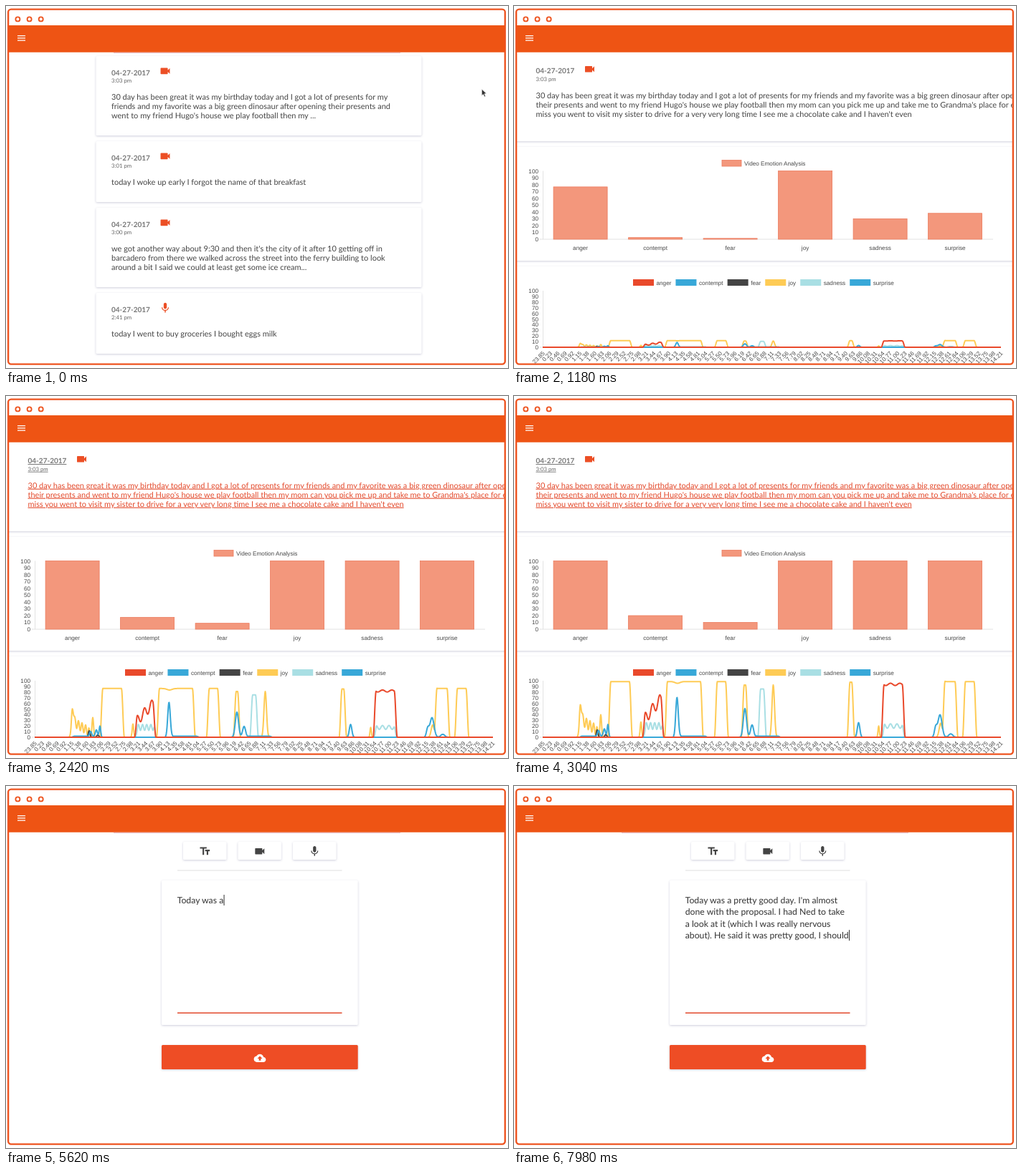
Write an HTML page that moves like this. It is 700x506 px and loops after 8 s.

```html
<!DOCTYPE html>
<html lang="en">
<head>
<meta charset="utf-8">
<title>Journal</title>
<style>
  html, body { margin: 0; width: 100%; height: 100%; overflow: hidden; background: #fff; }
  svg { display: block; width: 700px; height: 506px; }
  text { font-family: Lato, sans-serif; text-rendering: geometricPrecision; white-space: pre; }
  .date { font-size: 10px; font-weight: 700; fill: #777; }
  .time { font-size: 7.75px; fill: #666; }
  .body { font-size: 11px; fill: #444; }
  .hover text { text-decoration: underline; }
  .hover .body { fill: #e34a2c; }
  .chart text { font: 8.2px "Liberation Sans", Arial, sans-serif; fill: #484848; }
  .card { fill: #fff; filter: drop-shadow(0 1px 1.5px rgba(50, 50, 110, .24)); }
  .axis { stroke: #e2e2e2; stroke-width: 1; }
  .bar { fill: #f3977c; stroke: #ec7a5c; stroke-width: .8; }
  .line { fill: none; stroke-width: 2; stroke-linejoin: round; vector-effect: non-scaling-stroke; }
  .typed { font-size: 12.25px; fill: #333; }
</style>
</head>
<body>
<svg viewBox="0 0 700 506">
  <defs>
    <clipPath id="page"><rect x="4" y="64" width="691" height="435.5"/></clipPath>
    <path id="video" d="M17 10.5V7c0-.55-.45-1-1-1H4c-.55 0-1 .45-1 1v10c0 .55.45 1 1 1h12c.55 0 1-.45 1-1v-3.5l4 4v-11l-4 4z"/>
    <path id="mic" d="M12 14c1.66 0 3-1.34 3-3V5c0-1.66-1.34-3-3-3S9 3.34 9 5v6c0 1.66 1.34 3 3 3zm5.3-3c0 3-2.54 5.1-5.3 5.1S6.7 14 6.7 11H5c0 3.41 2.72 6.23 6 6.72V21h2v-3.28c3.28-.48 6-3.3 6-6.72z"/>
    <path id="type" d="M2.5 4v3h5v12h3V7h5V4zm19 5h-9v3h3v7h3v-7h3z"/>
    <path id="cloud" d="M19.35 10.04C18.67 6.59 15.64 4 12 4 9.11 4 6.6 5.64 5.35 8.04 2.34 8.36 0 10.91 0 14c0 3.31 2.69 6 6 6h13c2.76 0 5-2.24 5-5 0-2.64-2.05-4.78-4.65-4.96zM14 13v4h-4v-4H7l5-5 5 5z"/>
  </defs>
  <rect width="700" height="506" fill="#fff"/>
  <g clip-path="url(#page)">
    <g id="list"></g>
    <g id="detail"></g>
    <g id="editor"></g>
  </g>
  <rect x="3" y="27" width="693" height="37.7" fill="#ee5414"/>
  <path id="edge" d="M150 65.5H550" stroke="#e3b9c4"/>
  <g fill="none" stroke="#ee5420">
    <rect x="3.1" y="4.6" width="692.8" height="496" rx="4" stroke-width="2.4"/>
    <g stroke-width="1.9">
      <circle cx="16.4" cy="18.4" r="3"/><circle cx="32.6" cy="18.4" r="3"/><circle cx="48.7" cy="18.4" r="3"/>
    </g>
  </g>
  <path d="M16 41.7H27M16 44.9H27M16 48.1H27" stroke="#fff" stroke-width="1.3"/>
  <path id="cursor" d="M0 0V9.4L2.2 7.4L3.8 11L5.4 10.2L3.9 6.8L6.8 6.6Z" fill="#333" stroke="#fff" stroke-width=".7"/>
</svg>
<script>
const LOOP = 8000, ENTER = 340, OPEN = 950, HOVER = 1350, LEAVE = 4120, EDIT = 4420, TYPE = 5453;
const $ = id => document.getElementById(id);

function add(parent, tag, attrs = {}, content = "") {
  const node = document.createElementNS("http://www.w3.org/2000/svg", tag);
  for (const key in attrs) node.setAttribute(key, attrs[key]);
  node.textContent = content;
  return parent.appendChild(node);
}
const rect = (parent, x, y, width, height, attrs) => add(parent, "rect", { x, y, width, height, ...attrs });
const text = (parent, x, y, content, attrs) => add(parent, "text", { x, y, ...attrs }, content);
const hline = (parent, x1, x2, y, attrs) => add(parent, "line", { x1, x2, y1: y, y2: y, ...attrs });
const icon = (parent, name, cx, cy, fill = "#ec4f25", scale = .72) =>
  add(parent, "use", { href: "#" + name, fill, transform: `translate(${cx - 12 * scale} ${cy - 12 * scale}) scale(${scale})` });

function entry(parent, x, y, time, symbol, lines) {
  const group = add(parent, "g");
  text(group, x, y, "04-27-2017", { class: "date" });
  text(group, x, y + 10.8, time, { class: "time" });
  icon(group, symbol, x + 75, y - 5.7);
  lines.forEach((line, i) => text(group, x, y + 34.6 + i * 13, line, { class: "body" }));
  return group;
}

// List of entries
const list = $("list");
let cardTop = 70;
const entries = [
  ["3:03 pm", "video", ["30 day has been great it was my birthday today and I got a lot of presents for my",
    "friends and my favorite was a big green dinosaur after opening their presents and",
    "went to my friend Hugo's house we play football then my ..."]],
  ["3:01 pm", "video", ["today I woke up early I forgot the name of that breakfast"]],
  ["3:00 pm", "video", ["we got another way about 9:30 and then it's the city of it after 10 getting off in",
    "barcadero from there we walked across the street into the ferry building to look",
    "around a bit I said we could at least get some ice cream..."]],
  ["2:41 pm", "mic", ["today I went to buy groceries I bought eggs milk"]]
].map(([time, symbol, lines]) => {
  const y = cardTop, height = 72 + lines.length * 13;
  cardTop += height + 8;
  rect(list, 125.5, y, 454, height, { rx: 1.5, class: "card" });
  return entry(list, 147, y + 26.6, time, symbol, lines);
});

// Entry with charts
const detail = $("detail");
rect(detail, -5, 55, 720, 134, { class: "card" });
rect(detail, -5, 197, 720, 159, { class: "card" });
rect(detail, -5, 364, 720, 159, { class: "card" });
const story = entry(detail, 30.5, 94, "3:03 pm", "video", [
  "30 day has been great it was my birthday today and I got a lot of presents for my friends and my favorite was a big green dinosaur after opening",
  "their presents and went to my friend Hugo's house we play football then my mom can you pick me up and take me to Grandma's place for ever I",
  "miss you went to visit my sister to drive for a very very long time I see me a chocolate cake and I haven't even"]);

function axes(parent, top, bottom, right) {
  for (let v = 0; v <= 100; v += 10)
    text(parent, 34, bottom + 3 - (bottom - top) * v / 100, v, { "text-anchor": "end" });
  hline(parent, 36, right, bottom, { class: "axis" });
  add(parent, "line", { x1: 40.5, x2: 40.5, y1: top, y2: bottom, class: "axis" });
}

const chart = add(detail, "g", { class: "chart" });
rect(chart, 290, 215.5, 27, 8.5, { class: "bar" });
text(chart, 321, 223, "Video Emotion Analysis");
axes(chart, 230.5, 326, 668);
const totals = { anger: 640, contempt: 20, fear: 10, joy: 900, sadness: 250, surprise: 317 };
const bars = Object.entries(totals).map(([name, total], i) => {
  const cx = 92.6 + i * 104.5;
  text(chart, cx, 341, name, { "text-anchor": "middle" });
  return { total, node: rect(chart, cx - 37.5, 326, 75, 0, { class: "bar" }) };
});

const colors = { anger: "#e9492b", contempt: "#38a8d8", fear: "#444", joy: "#fecb55", sadness: "#a9dfe4", surprise: "#38a8d8" };
let legendX = 166;
for (const name in colors) {
  rect(chart, legendX, 382, 29, 9, { fill: colors[name] });
  legendX += 38.5 + text(chart, legendX + 32.5, 390, name).getComputedTextLength();
}
axes(chart, 398, 477, 679);
for (let i = 0; i <= 62; i++) {
  const label = i ? (i * .2292).toFixed(2) : "23.85";
  text(chart, 0, 0, label, { "text-anchor": "end", transform: `translate(${43.5 + i * 10.3} 486) rotate(-45)` });
}

// Emotion curves: flat blocks, narrow spikes and regular ripples
const progress = (t, from, to) => Math.min(1, Math.max(0, (t - from) / (to - from)));
const smooth = k => k * k * (3 - 2 * k);
const block = (x, left, right, height) =>
  height * smooth(progress(x, left, left + 4)) * smooth(progress(x, right, right - 4));
const spike = (x, center, width, height) => height * Math.exp(-(((x - center) / width) ** 2));
const ripple = (x, peak, period) => Math.cos((x - peak) / period * 2 * Math.PI);

const series = {
  sadness: x => block(x, 180, 210, 20 + 6 * ripple(x, 202, 5.8)) + block(x, 340, 352, 86)
    + block(x, 513, 545, 20 + 4 * ripple(x, 525, 9)),
  joy: x => block(x, 131, 165, 99) + block(x, 210, 264, 99 - spike(x, 228, 5, 3)) + block(x, 279.5, 299, 99)
    + block(x, 317, 327, 93) + spike(x, 361.5, 2.5, 93) + block(x, 464.5, 475, 98) + block(x, 597, 619, 99)
    + spike(x, 595, 3, 25) + block(x, 625.5, 645.5, 99) + spike(x, 177, 1.5, 27) + spike(x, 508.5, 1.3, 20)
    + spike(x, 92.5, 2.2, 38) + block(x, 90, 119, (130 - x) * .85 + 9 * ripple(x, 111, 5)) + spike(x, 121, 1.6, 40),
  fear: x => spike(x, 116, 1.7, 13) + spike(x, 128, 1.8, 5),
  contempt: x => spike(x, 227.3, 2.5, 71) + spike(x, 322, 3.2, 51) + spike(x, 332, 3, 22) + spike(x, 480.5, 2.5, 26)
    + spike(x, 588, 2.5, 17) + spike(x, 594, 4, 40) + spike(x, 609, 4, 6) + spike(x, 118, 2, 10)
    + spike(x, 126, 2, 13) + spike(x, 131, 1.5, 21) + block(x, 91, 134, 2) + block(x, 228, 270, 2) + block(x, 335, 372, 2),
  anger: x => block(x, 179, 209, 34 + 1.55 * (x - 183) + 10 * ripple(x, 193, 10))
    + block(x, 512, 545.5, 94 + 2 * ripple(x, 525, 13))
};
function curve(value) {
  const points = [];
  for (let x = 40; x <= 679; x += .5) points.push(`${x} ${-value(x).toFixed(2)}`);
  return "M" + points.join("L");
}
const plot = add(chart, "g");
for (const name in series) add(plot, "path", { d: curve(series[name]), stroke: colors[name], class: "line" });

// Editor
const editor = $("editor");
["type", "video", "mic"].forEach((name, i) => {
  rect(editor, 247 + i * 76.5, 78, 60.5, 25, { rx: 1.5, class: "card" });
  icon(editor, name, 277.3 + i * 76.5, 91.2, "#444");
});
hline(editor, 239, 468.5, 118, { stroke: "#dedede" });
rect(editor, 217, 132, 273.7, 202, { rx: 1.5, class: "card" });
hline(editor, 239, 468.5, 317.3, { stroke: "#e2492c", "stroke-width": 1.4 });
rect(editor, 217, 362, 273.7, 34, { rx: 1.5, class: "card", style: "fill:#ee4d25" });
icon(editor, "cloud", 354, 380.3, "#fff", .7);

const draft = ["Today was a pretty good day. I'm almost ", "done with the proposal. I had Ned to take ",
  "a look at it (which I was really nervous ", "about). He said it was pretty good, I should"];
const lineY = i => 164 + i * 16.4;
const rows = draft.map((_, i) => text(editor, 238.7, lineY(i), "", { class: "typed" }));
const caret = rect(editor, 0, 0, 1, 15, { fill: "#333" });

function type(count) {
  let active = 0;
  draft.forEach((line, i) => {
    const shown = line.slice(0, Math.max(0, count));
    rows[i].textContent = shown;
    if (shown) active = i;
    count -= line.length;
  });
  caret.setAttribute("x", 239 + rows[active].getComputedTextLength());
  caret.setAttribute("y", lineY(active) - 12);
}

// The arrow disappears while it rests on an entry or in the text field
function pointer(t) {
  if (t < ENTER) {
    const k = smooth(progress(t, 0, 400));
    return [663.3 - 90 * k, 116 + 16 * k];
  }
  if (t >= LEAVE && t < EDIT) return [177, 67.3];
  if (t >= EDIT && t < TYPE - 130) {
    const k = smooth(progress(t, 4880, TYPE - 130));
    return [505 - 175 * k, 394 - 230 * k];
  }
}

const show = (node, on) => node.setAttribute("visibility", on ? "visible" : "hidden");

function draw(t) {
  const inDetail = t >= OPEN && t < EDIT;
  show(list, t < OPEN);
  show(detail, inDetail);
  show(editor, t >= EDIT);
  show($("edge"), !inDetail);
  entries[0].classList.toggle("hover", t >= ENTER);
  story.classList.toggle("hover", t >= HOVER);

  const growth = 1 - (1 - progress(t, 1048, 3187)) ** 2;
  bars.forEach(({ total, node }) => {
    const height = Math.min(100, total * growth) * .955;
    node.setAttribute("y", 326 - height);
    node.setAttribute("height", height);
  });
  plot.setAttribute("transform", `translate(0 477) scale(1 ${Math.max(.001, .79 * growth)})`);

  type(Math.floor((t - TYPE) / 15.1 + .3));

  const spot = pointer(t);
  show($("cursor"), spot);
  if (spot) $("cursor").setAttribute("transform", `translate(${spot})`);
}

let start;
function frame(now) {
  start ??= now;
  draw((now - start) % LOOP);
  requestAnimationFrame(frame);
}
draw(0);
requestAnimationFrame(frame);
</script>
</body>
</html>
```
